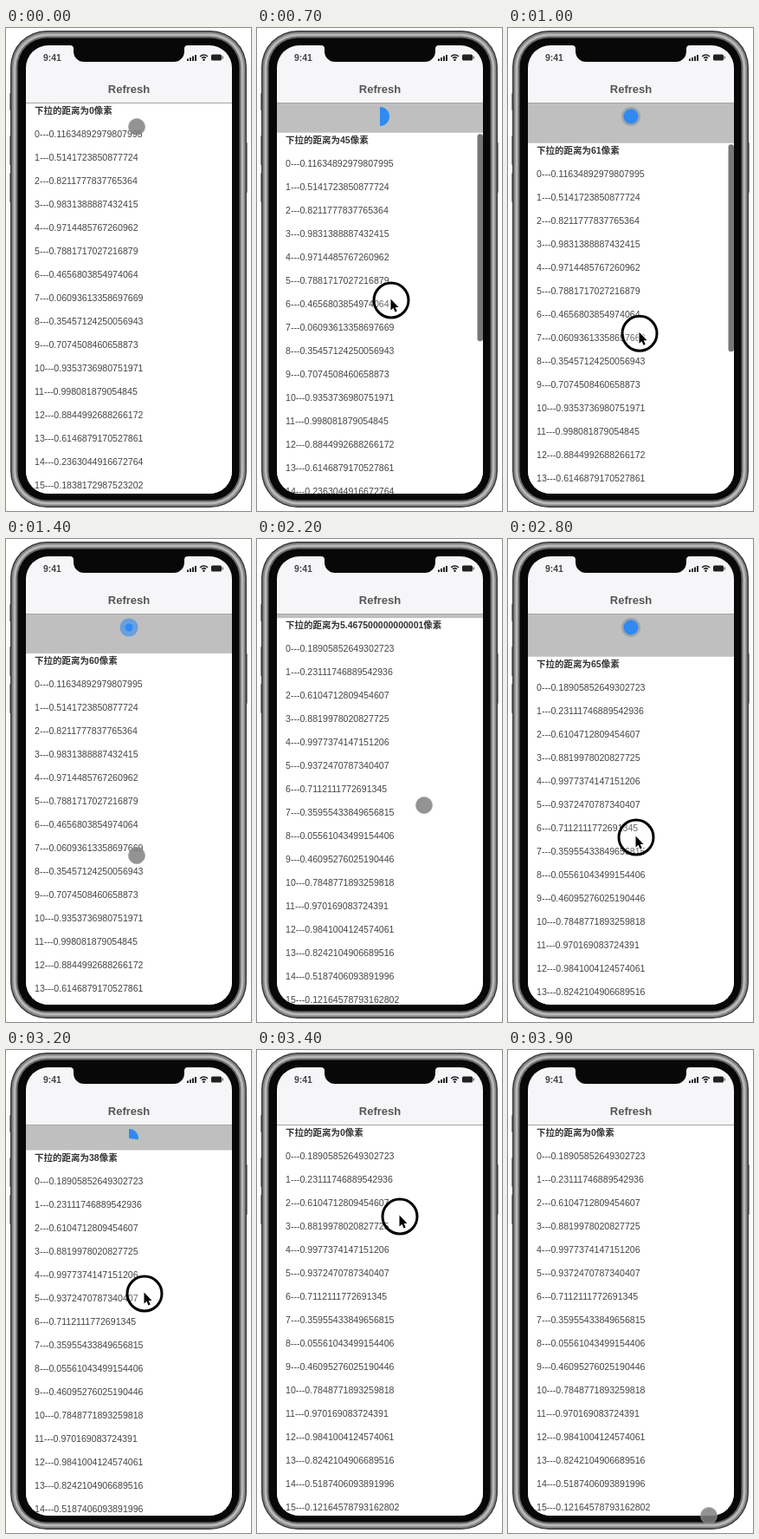
Write an HTML page with a canvas that moves like this. It is 283 by 557 pixels and loops after 4 s.

```html
<!DOCTYPE html>
<html lang="zh-CN">
<head>
<meta charset="utf-8">
<title>Refresh</title>
<style>
html, body { margin: 0; width: 100%; height: 100%; overflow: hidden; background: #fff; }
canvas { display: block; }
</style>
</head>
<body>
<canvas id="stage" width="283" height="557"></canvas>
<script>
const ctx = document.getElementById('stage').getContext('2d');
const LOOP = 4000, STEP = 100, SNAP = 250;
const SCALE = 0.75, PULL = 0.32 / SCALE, HOLD = 60;
const RELEASE = 1150, REFRESHED = 2062.5;
const SCREEN = { x: 23, y: 20, w: 238, h: 517 };
const BOTTOM = SCREEN.y + SCREEN.h;
const TOP = 87, ROW = 27, ROWS = 16;
const BLUE = '#2f8af2', INK = '#080808';
const SANS = '"Liberation Sans", "Noto Sans CJK SC", "Noto Sans CJK", sans-serif';

// Seeded random fractions in [0, 1) for one load of the list
const randomRows = seed => Array.from({ length: ROWS }, (_, i) =>
  Math.abs(Math.sin((i + 1) * 12.9898 + seed * 78.233)));
const before = randomRows(1), after = randomRows(2);

// Key points of the pointer: time, x, y
const path = [
  [200, 151, 114], [700, 155, 314], [1100, 151, 365], [1900, 151, 365],
  [2200, 193, 307], [2400, 168, 205], [2800, 148, 344], [3200, 160, 281],
  [3400, 165, 192], [3500, 165, 192], [3900, 232, 537]
];

function pointerAt(t) {
  const i = Math.max(1, path.findIndex(p => p[0] >= t));
  const [t0, x0, y0] = path[i - 1], [t1, x1, y1] = path[i];
  const k = Math.max(0, (t - t0) / (t1 - t0));
  return { x: x0 + (x1 - x0) * k, y: y0 + (y1 - y0) * k };
}

const isPressed = t => (t >= 300 && t < RELEASE) || (t >= 2400 && t < 3600);
const isRefreshing = t => t > RELEASE && t < REFRESHED;

function snap(from, to, elapsed) {
  const left = 1 - Math.min(1, elapsed / SNAP);
  return to + (from - to) * left ** 3;
}

function distanceAt(t) {
  if (isPressed(t)) {
    const start = t < RELEASE ? 209 : 192;
    return Math.max(0, Math.round((pointerAt(t).y - start) * PULL));
  }
  if (isRefreshing(t)) return snap(66, HOLD, t - RELEASE);
  return t > REFRESHED ? snap(HOLD, 0, t - REFRESHED) : 0;
}

const formatDistance = d => Number.isInteger(d) ? String(d) : d.toFixed(4) + '00000000001';

function rounded(x, y, w, h, r, fill) {
  ctx.beginPath();
  ctx.roundRect(x, y, w, h, r);
  ctx.fillStyle = fill;
  ctx.fill();
}

function circle(x, y, r, fill) {
  ctx.beginPath();
  ctx.arc(x, y, r, 0, Math.PI * 2);
  ctx.fillStyle = fill;
  ctx.fill();
}

function label(text, x, y, font, color, align = 'left') {
  ctx.font = `${font} ${SANS}`;
  ctx.fillStyle = color;
  ctx.textAlign = align;
  ctx.fillText(text, x, y);
}

function drawPhone() {
  rounded(4, 75, 3, 20, 1, '#888');
  rounded(4, 124, 3, 34, 1, '#888');
  rounded(4, 167, 3, 34, 1, '#888');
  rounded(276, 132, 3, 58, 1, '#888');
  const rings = [[0, '#3a3a3a'], [1.5, '#858585'], [3.5, '#b8b8b8'], [6.5, '#6a6a6a'], [8.5, INK]];
  for (const [inset, color] of rings) {
    rounded(5 + inset, 3 + inset, 273 - inset * 2, 550 - inset * 2, 42 - inset, color);
  }
}

function drawNotch() {
  const left = 78, right = 206, top = SCREEN.y, bottom = 39, r = 12;
  ctx.beginPath();
  ctx.moveTo(left - 4, top);
  ctx.quadraticCurveTo(left, top, left, top + 4);
  ctx.arcTo(left, bottom, left + r, bottom, r);
  ctx.arcTo(right, bottom, right, bottom - r, r);
  ctx.lineTo(right, top + 4);
  ctx.quadraticCurveTo(right, top, right + 4, top);
  ctx.fillStyle = INK;
  ctx.fill();
}

function drawHeader() {
  ctx.fillStyle = '#f6f6f8';
  ctx.fillRect(SCREEN.x, SCREEN.y, SCREEN.w, TOP - 1 - SCREEN.y);
  ctx.fillStyle = '#a5a5a5';
  ctx.fillRect(SCREEN.x, TOP - 1, SCREEN.w, 1);
  drawNotch();
  label('Refresh', 142, 75, 'bold 13px', '#555', 'center');
  label('9:41', 43, 38, 'bold 10.4px', '#444');

  ctx.fillStyle = '#222';
  for (let i = 0; i < 4; i++) ctx.fillRect(209 + i * 3, 35.5 - i * 1.5, 2, 2.5 + i * 1.5);
  ctx.strokeStyle = '#222';
  ctx.lineWidth = 1.5;
  for (const r of [3.3, 6]) {
    ctx.beginPath();
    ctx.arc(228.5, 37, r, -Math.PI * 0.76, -Math.PI * 0.24);
    ctx.stroke();
  }
  circle(228.5, 36.7, 1.3, '#222');
  rounded(237, 30.5, 12, 7, 1.5, '#222');
  ctx.fillRect(249.7, 32.5, 1, 3);
}

function drawIndicator(t, d) {
  const x = 142, y = 102, r = 11;
  if (isRefreshing(t)) {
    const pulse = Math.cos((t - 1300) / 800 * Math.PI * 2);
    circle(x, y, 10.5, 'rgba(47,138,242,.6)');
    circle(x, y, 6.6 - 3 * pulse, BLUE);
  } else if (d >= HOLD) {
    circle(x, y, r, '#9ca4ac');
    circle(x, y, 8.5, BLUE);
  } else if (d > HOLD / 2) {
    const part = d / (HOLD / 2) - 1;
    ctx.beginPath();
    ctx.moveTo(x, y);
    ctx.arc(x, y, r, -Math.PI / 2, (part * 2 - 0.5) * Math.PI);
    ctx.fillStyle = BLUE;
    ctx.fill();
  }
}

function drawList(t, d) {
  const top = TOP + d * SCALE;
  ctx.fillStyle = '#fff';
  ctx.fillRect(SCREEN.x, top, SCREEN.w, BOTTOM - top);
  label(`下拉的距离为${formatDistance(d)}像素`, 33, top + 12, 'bold 10.5px', '#333');
  (t < REFRESHED ? before : after).forEach((value, i) => {
    label(`${i}---${value}`, 33, top + 12 + ROW * (i + 1), '10.6px', '#444');
  });
  if (t >= 500 && t <= 1000) rounded(254.5, top + 1.5, 6.5, 239, 3, '#777');
}

function drawPointer(t) {
  const { x, y } = pointerAt(t);
  if (!isPressed(t)) {
    circle(x, y, 9.5, 'rgba(128,128,128,.85)');
    ctx.strokeStyle = 'rgba(155,155,155,.7)';
    ctx.lineWidth = 1;
    ctx.stroke();
    return;
  }
  circle(x, y, 20, 'rgba(255,255,255,.2)');
  ctx.strokeStyle = '#000';
  ctx.lineWidth = 3;
  ctx.stroke();
  ctx.save();
  ctx.translate(x - 0.5, y - 1.5);
  const arrow = new Path2D('M0 0V13L3 10.3L5 15L7.2 14L5.2 9.5H9Z');
  ctx.strokeStyle = '#fff';
  ctx.lineWidth = 2;
  ctx.stroke(arrow);
  ctx.fillStyle = '#000';
  ctx.fill(arrow);
  ctx.restore();
}

function draw(t) {
  const d = distanceAt(t);
  ctx.fillStyle = '#fff';
  ctx.fillRect(0, 0, 283, 557);
  drawPhone();
  ctx.save();
  ctx.beginPath();
  ctx.roundRect(SCREEN.x, SCREEN.y, SCREEN.w, SCREEN.h, 26);
  ctx.clip();
  ctx.fillStyle = '#bfbfbf';
  ctx.fillRect(SCREEN.x, TOP, SCREEN.w, BOTTOM - TOP);
  drawIndicator(t, d);
  drawList(t, d);
  drawHeader();
  ctx.restore();
  drawPointer(t);
}

const origin = performance.now();
function tick() {
  const t = (performance.now() - origin) % LOOP;
  draw(Math.floor(t / STEP) * STEP);
  requestAnimationFrame(tick);
}
tick();
</script>
</body>
</html>
```
